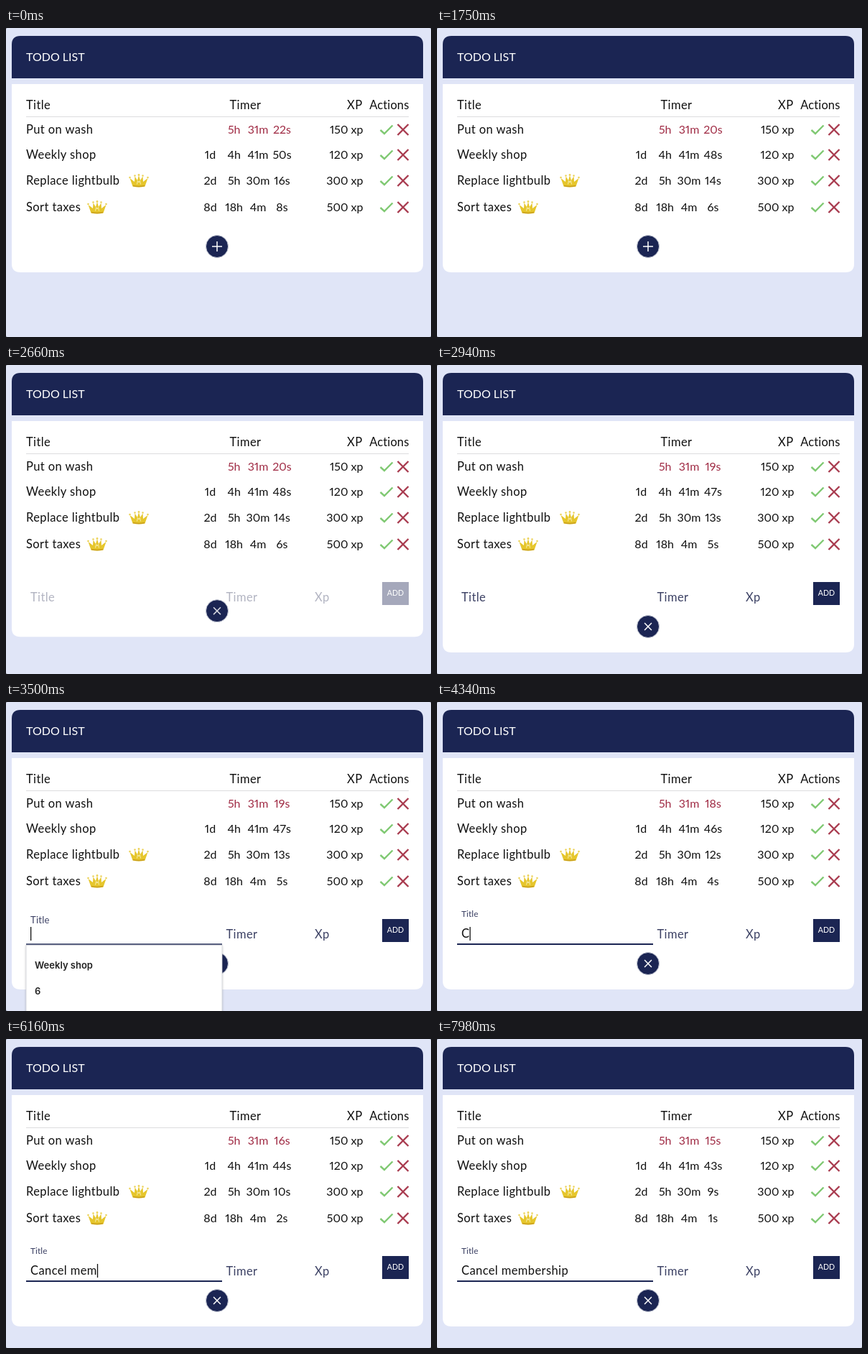
These frames come from a looping animation (592x430 px, 8000 ms). An HTML page:

```html
<!DOCTYPE html>
<html lang="en">
<head>
<meta charset="utf-8">
<title>Todo list</title>
<style>
  html, body { margin: 0; width: 100%; height: 100%; overflow: hidden; background: #e0e5f7; }
  svg { display: block; width: 592px; height: 430px; }
  text { font: 16.5px Lato, "Open Sans", sans-serif; letter-spacing: .4px; fill: #111; white-space: pre; }
  .num { font-size: 16px; letter-spacing: 0; font-variant-numeric: proportional-nums; }
  .mid { text-anchor: middle; }
  .end { text-anchor: end; }
  .late { fill: #a02c45; }
  .label { fill: #3c4164; }
  .heading { font-size: 16px; letter-spacing: 0; fill: #fff; }
  .add { font-size: 10.7px; letter-spacing: 0; fill: #fff; }
  .option { font: 600 13px Inter, sans-serif; letter-spacing: 0; fill: #222; }
</style>
</head>
<body>
<svg viewBox="0 0 592 430">
  <defs>
    <g id="crown">
      <path d="M5.5 17.5 L1.5 6 L8 11 L8.5 3.5 L12 9 L14 2 L16 9 L19.5 3.5 L20 11 L26.500 6 L22.500 17.500 Q14 19.500 5.500 17.500Z" fill="#e6c62c"/>
      <path d="M6 16.500 Q14 18.500 22 16.500" fill="none" stroke="#c99f1c" stroke-width="1.300"/>
      <path d="M11.500 14.500 L12.500 9.500 L14 12 L15.500 9.500 L16.500 14.500" fill="none" stroke="#f8edac"/>
      <g fill="#ecd35a">
        <circle cx="1.500" cy="5" r="1.300"/><circle cx="8.500" cy="2.500" r="1.300"/>
        <circle cx="14" cy="1.500" r="1.400"/>
        <circle cx="19.500" cy="2.500" r="1.300"/><circle cx="26.500" cy="5" r="1.300"/>
      </g>
    </g>
    <g id="actions" fill="none">
      <path d="M521.500 142 L527 147 L538.500 135.500" stroke="#80c973" stroke-width="2.400"/>
      <path d="M545.500 134 L560.500 149 M560.500 134 L545.500 149" stroke="#a83a4e" stroke-width="2.300"/>
    </g>
    <filter id="shadow" x="-10%" y="-10%" width="120%" height="120%">
      <feDropShadow dx="0" dy="1" stdDeviation="1.500" flood-opacity=".25"/>
    </filter>
  </defs>

  <rect width="592" height="430" fill="#777b88"/>
  <rect width="592" height="430" rx="2" fill="#e0e5f7"/>
  <path d="M8 70 V23 Q8 11 20 11 H569 Q581 11 581 23 V70Z" fill="#1b2553"/>
  <text class="heading" x="28" y="46">TODO LIST</text>

  <path id="card" fill="#fff"/>
  <text x="28" y="113">Title</text>
  <text class="mid" x="333.500" y="113">Timer</text>
  <text class="end" x="496.500" y="113">XP</text>
  <text class="end" x="561.400" y="113" style="letter-spacing:.1px">Actions</text>
  <path d="M28 123.500 H561" stroke="#dcdcdf"/>
  <g id="rows"></g>

  <g id="form">
    <text id="title" class="label" x="34">Title</text>
    <text class="label" x="306.500" y="329">Timer</text>
    <text class="label" x="430" y="329">Xp</text>
    <rect x="524" y="302" width="37" height="32" fill="#1b2553"/>
    <text class="add mid" x="542.500" y="321">ADD</text>
    <path id="line" d="M28 337 H301" stroke="#1b2553" stroke-width="2"/>
    <text id="typed" x="34" y="328"></text>
    <rect id="caret" y="313" width="1.300" height="19" fill="#111"/>
  </g>

  <g id="button">
    <circle r="15.500" fill="#1b2553" stroke="#c3c7d3"/>
    <path id="icon" d="M-7 0 H7 M0 -7 V7" stroke="#fff" stroke-width="1.500"/>
  </g>

  <g id="menu">
    <rect x="28" y="338.500" width="273" height="110" fill="#fff" stroke="#c9cad2" stroke-width=".7" filter="url(#shadow)"/>
    <text class="option" x="40" y="371">Weekly shop</text>
    <text class="option" x="40" y="407">6</text>
  </g>
</svg>
<script>
const LOOP = 8000;
const $ = id => document.getElementById(id);
const clamp = v => Math.min(1, Math.max(0, v));
const span = (t, from, to) => clamp((t - from) / (to - from));
const countUntil = (times, t) => times.filter(at => at <= t).length;
const show = (el, on) => el.setAttribute('visibility', on ? 'visible' : 'hidden');

// cubic-bezier(.4, 0, .2, 1)
function ease(x) {
  let lo = 0, hi = 1;
  for (let i = 0; i < 20; i++) {
    const s = (lo + hi) / 2, r = 1 - s;
    if (1.2 * r * r * s + .6 * r * s * s + s ** 3 < x) lo = s; else hi = s;
  }
  return lo * lo * (3 - 2 * lo);
}

const tasks = [
  { name: 'Put on wash', y: 147, units: ['', '5h', '31m'], sec: 22, xp: 150, late: true },
  { name: 'Weekly shop', y: 182, units: ['1d', '4h', '41m'], sec: 50, xp: 120 },
  { name: 'Replace lightbulb', y: 218, units: ['2d', '5h', '30m'], sec: 16, xp: 300, crown: 171 },
  { name: 'Sort taxes', y: 255, units: ['8d', '18h', '4m'], sec: 8, xp: 500, crown: 113 }
];
const columns = [284.5, 317.7, 351, 384.5];
const ticks = [840, 1750, 2800, 3850, 4900, 5950, 7000];

const phrase = 'Cancel membership';
const focusAt = 3360;
const keys = [4340, 4620, 4690, 4830, 4900, 5040, 5460, 5950, 6020, 6160,
  6370, 6510, 6790, 7000, 7140, 7280, 7420];

$('rows').innerHTML = tasks.map(task => {
  const tone = task.late ? ' late' : '';
  const timer = [...task.units, ''].map((unit, i) =>
    `<text class="num mid${tone}${i === 3 ? ' sec' : ''}" x="${columns[i]}" y="${task.y}">${unit}</text>`).join('');
  const crown = task.crown ? `<use href="#crown" x="${task.crown}" y="${task.y - 15}"/>` : '';
  return `<text x="28" y="${task.y}">${task.name}</text>${crown}${timer}
    <text class="num end" x="497.500" y="${task.y}">${task.xp} xp</text>
    <use href="#actions" y="${task.y - 147}"/>`;
}).join('');
const seconds = document.querySelectorAll('.sec');

function drawTimers(t) {
  const passed = countUntil(ticks, t);
  tasks.forEach((task, i) => { seconds[i].textContent = task.sec - passed + 's'; });
}

function drawPanel(t) {
  const open = ease(span(t, 2480, 2920));
  const bottom = 340 + 60 * open;
  $('card').setAttribute('d',
    `M8 78 H581 V${bottom - 12} Q581 ${bottom} 569 ${bottom} H20 Q8 ${bottom} 8 ${bottom - 12}Z`);
  $('button').setAttribute('transform', `translate(294 ${304 + 60 * open})`);
  $('icon').setAttribute('transform', `rotate(${t < 2500 ? 0 : 45})`);
  $('icon').setAttribute('opacity', 1 - .25 * span(t, 2240, 2380) + .25 * span(t, 2600, 2800));
  $('form').setAttribute('opacity', span(open, .4, 1));
}

function drawField(t) {
  const lift = ease(span(t, 3340, 3695));
  $('title').setAttribute('y', 329 - 30 * lift);
  $('title').style.fontSize = 16.5 - 4.7 * lift + 'px';
  $('title').style.letterSpacing = .4 - .3 * lift + 'px';
  $('line').setAttribute('opacity', lift);
  show($('menu'), t >= 3430 && t < keys[0]);

  const count = countUntil(keys, t);
  const typed = $('typed');
  typed.textContent = phrase.slice(0, count);
  const width = count ? typed.getComputedTextLength() : 0;
  $('caret').setAttribute('x', 34 + width);
  const idle = t - (count ? keys[count - 1] : focusAt);
  show($('caret'), idle >= 0 && idle % 1000 < 500);
}

function draw(t) {
  drawTimers(t);
  drawPanel(t);
  drawField(t);
}

const start = performance.now();
function loop() {
  draw((performance.now() - start) % LOOP);
  requestAnimationFrame(loop);
}
loop();
</script>
</body>
</html>
```
